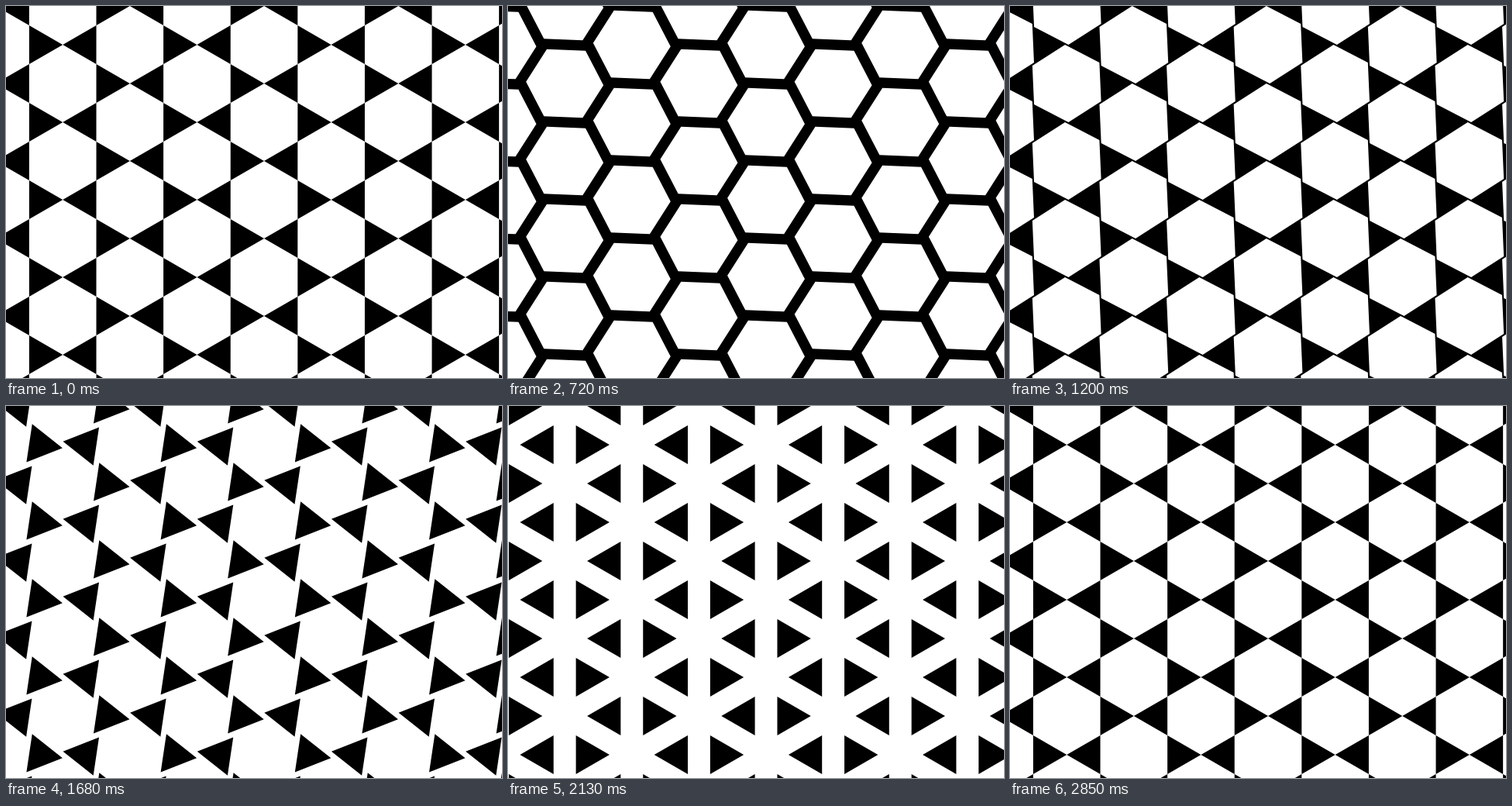
An HTML page with a canvas that plays this animation: 640x480 px, repeating every 2.88 s.

```html
<!DOCTYPE html>
<html lang="en">
<head>
<meta charset="utf-8">
<title>Turning tiles</title>
<style>
  html, body { margin: 0; width: 100%; height: 100%; overflow: hidden; background: #fff; }
  canvas { display: block; }
</style>
</head>
<body>
<canvas id="stage" width="640" height="480"></canvas>
<script>
const ctx = document.getElementById('stage').getContext('2d');
const STEP = 30, HALF = 48;         // ms per step, steps per half of the loop
const R = 50;                       // hexagon radius, also the triangle side
const COL = R * Math.sqrt(3);       // distance between hexagon columns
const TRI = R / Math.sqrt(3);       // triangle radius
const X0 = 5 * COL - 360 + 0.2;     // x of the first full column

const ease = t => t < 0.5 ? 2 * t * t : 1 - 2 * (1 - t) ** 2;

function polygon(x, y, radius, sides, degrees) {
  for (let i = 0; i < sides; i++) {
    const a = (degrees + i * 360 / sides) * Math.PI / 180;
    const px = x + radius * Math.cos(a), py = y + radius * Math.sin(a);
    if (i) ctx.lineTo(px, py); else ctx.moveTo(px, py);
  }
  ctx.closePath();
}

function eachCell(draw) {
  for (let c = -2; c < 9; c++)
    for (let r = -1; r < 7; r++)
      draw(X0 + c * COL, r * 2 * R + (c % 2 ? R : 0));
}

function paint(back, front, draw) {
  ctx.fillStyle = back;
  ctx.fillRect(0, 0, 640, 480);
  ctx.fillStyle = front;
  ctx.beginPath();
  eachCell(draw);
  ctx.fill();
}

function frame() {
  const n = (Math.floor(performance.now() / STEP + 1e-6) + 1) % (2 * HALF);
  if (n > 0 && n <= HALF) {
    const turn = 60 * ease(n / HALF);
    paint('#000', '#fff', (x, y) => polygon(x, y, R, 6, turn - 90));
  } else {
    const turn = 120 * ease(((n + HALF) % (2 * HALF)) / HALF);
    paint('#fff', '#000', (x, y) => {
      polygon(x - TRI, y - R, TRI, 3, turn);
      polygon(x + TRI, y - R, TRI, 3, turn + 180);
    });
  }
  requestAnimationFrame(frame);
}
frame();
</script>
</body>
</html>
```
